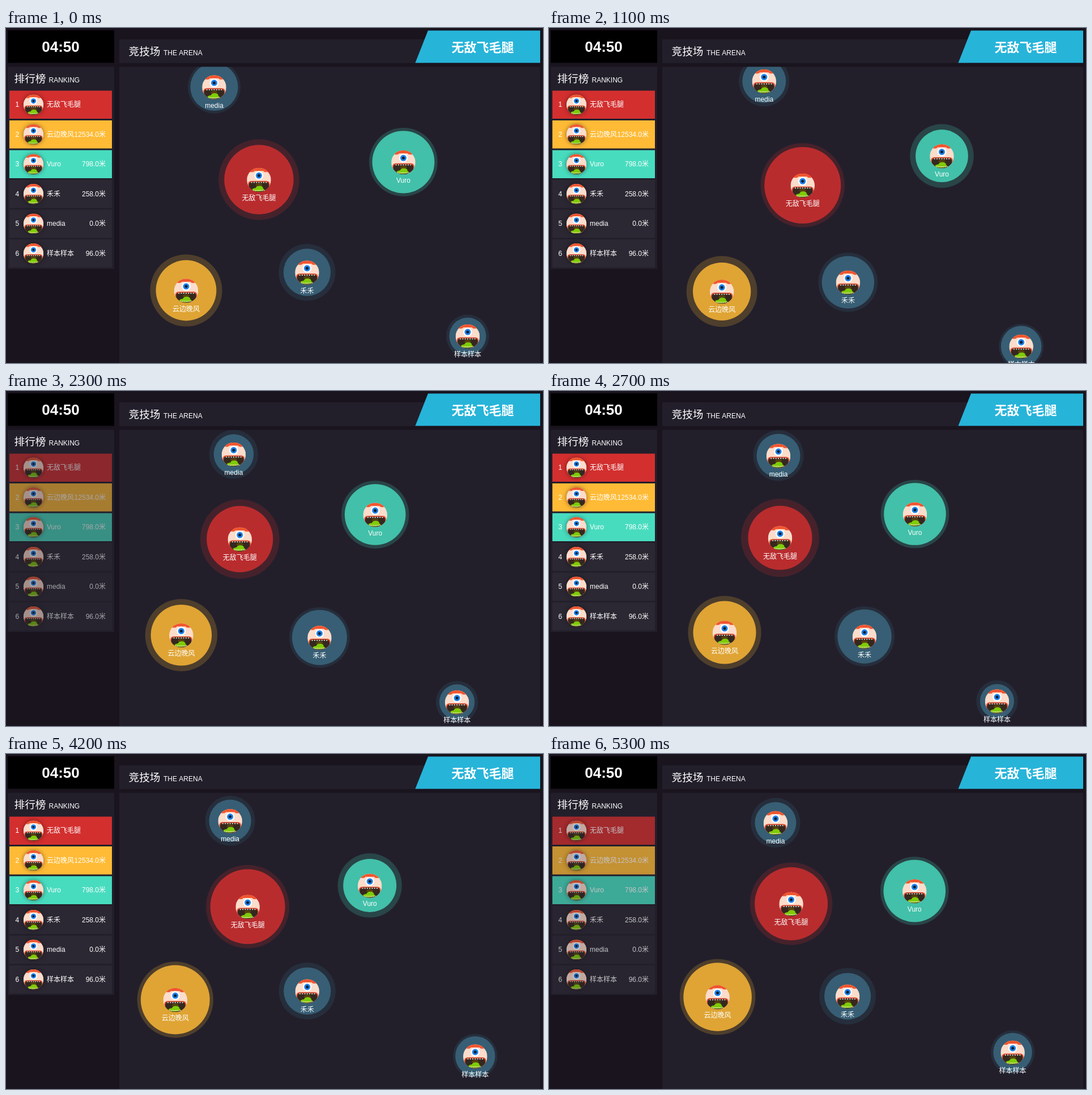
These frames come from a looping animation (948x591 px, 5.4 s). An HTML page with a canvas:

```html
<!DOCTYPE html>
<html lang="zh">
<head>
<meta charset="utf-8">
<title>竞技场</title>
<style>
html, body { margin: 0; width: 100%; height: 100%; overflow: hidden; background: #19141e; }
canvas { display: block; }
</style>
</head>
<body>
<canvas id="stage" width="948" height="591"></canvas>
<script>
const W = 948, H = 591, LOOP = 5400, TICK = 100;
const FONT = '"Liberation Sans", Arial, "Noto Sans CJK SC", "Noto Sans CJK", sans-serif';
const PAGE = '#19141e', PANEL = '#221f2b', GREY = '#2b2833';
const RED = '#d32f2f', GOLD = '#ffbb36', MINT = '#48dcbf', BLUE = '#3b6a81';

// All balls glide from waypoint to waypoint together; the loop opens mid-leg.
const LEG = 1800;

// In ranking order. pulse: period and moment of the largest size, in ms.
const players = [
  { name: '无敌飞毛腿', score: '', color: RED, pulse: [3650, 1000],
    path: [[444, 257], [449, 278], [408, 259], [428, 270], [427, 256]] },
  { name: '云边晚风', score: '12534.0米', color: GOLD, pulse: [7000, 4600],
    path: [[331, 460], [305, 466], [310, 426], [298, 434], [297, 421]] },
  { name: 'Vuro', score: '798.0米', color: MINT, pulse: [2600, 0],
    path: [[708, 247], [695, 226], [646, 217], [642, 233], [650, 254]] },
  { name: '禾禾', score: '258.0米', color: BLUE, pulse: [5500, 2100],
    path: [[536, 413], [527, 449], [557, 433], [530, 417], [523, 442]] },
  { name: 'media', score: '0.0米', color: BLUE, pulse: [1600, 1520],
    path: [[356, 115], [379, 93], [405, 114], [395, 118], [407, 126]] },
  { name: '样本样本', score: '96.0米', color: BLUE, pulse: [3650, 1000],
    path: [[795, 525], [835, 562], [791, 547], [831, 532], [801, 518]] }
];

const stage = document.getElementById('stage').getContext('2d');

const ease = u => (1 - Math.cos(Math.PI * u)) / 2;
const mix = (a, b, u) => a + (b - a) * u;

function text(c, str, x, y, size, align = 'left', weight = '') {
  c.font = `${weight} ${size}px ${FONT}`;
  c.textAlign = align;
  c.fillStyle = '#fff';
  c.fillText(str, x, y);
}

function rect(c, color, x, y, w, h) {
  c.fillStyle = color;
  c.fillRect(x, y, w, h);
}

function blob(c, color, x, y, rx, ry = rx) {
  c.fillStyle = color;
  c.beginPath();
  c.ellipse(x, y, rx, ry, 0, 0, Math.PI * 2);
  c.fill();
}

function mouth(c, color, inset) {
  c.fillStyle = color;
  c.beginPath();
  c.roundRect(-0.9 + inset, 0.08 + inset, 1.8 - 2 * inset, 0.92 - inset, [0.25, 0.25, 0.5, 0.5]);
  c.fill();
}

function monster(c, x, y, r) {
  c.save();
  c.translate(x, y);
  c.scale(r, r);
  c.beginPath();
  c.arc(0, 0, 1, 0, Math.PI * 2);
  c.clip();
  rect(c, '#fcdccb', -1, -1, 2, 2);
  rect(c, '#f1552f', -1, -1, 2, 0.26);
  for (const side of [-1, 1]) blob(c, '#f1552f', side * 0.6, -0.74, 0.22, 0.1);
  blob(c, '#ffffff', 0, -0.36, 0.37);
  blob(c, '#1f82ee', 0, -0.36, 0.26);
  blob(c, '#10202f', 0, -0.36, 0.12);
  mouth(c, '#e2492f', 0);
  mouth(c, '#35281f', 0.07);
  blob(c, '#55420f', 0, 0.42, 0.28, 0.14);
  blob(c, '#7fcb08', 0.04, 0.66, 0.3, 0.17);
  blob(c, '#7fcb08', -0.06, 0.8, 0.5, 0.15);
  for (let i = -3; i <= 3; i++) {
    rect(c, '#f7e3d2', i * 0.2 - 0.05, 0.17, 0.1, 0.08);
    rect(c, '#f7e3d2', i * 0.15 - 0.05, 0.84, 0.1, 0.06);
  }
  c.restore();
}

// The rows are painted once so that they can fade as a group.
function paintRows() {
  const layer = document.createElement('canvas');
  layer.width = 192;
  layer.height = H;
  const c = layer.getContext('2d');
  players.forEach(({ name, score, color }, i) => {
    const top = 110.5 + i * 52.5, mid = top + 24.75, base = Math.round(mid + 4);
    rect(c, color === BLUE ? GREY : color, 6, top, 181, 49.5);
    c.save();
    c.shadowColor = 'rgba(0,0,0,.55)';
    c.shadowBlur = 8;
    blob(c, '#6b4a40', 48.5, mid, 17);
    c.restore();
    monster(c, 48.5, mid, 17.8);
    text(c, String(i + 1), 16.5, base, 12);
    text(c, name, 72, base, 12);
    text(c, score, 176, base, 12, 'right');
  });
  return layer;
}
const rowLayer = paintRows();

// The list is cleared every 2900 ms, returns 300 ms later (null until then) and fades in.
function listOpacity(t) {
  if (t < 1600) return 1;
  const since = (t - 1600) % 2900 - 300;
  return since < 0 ? null : Math.min(1, (since + 50) / 750);
}

function drawBall(c, { name, color, pulse, path }, rank, t) {
  const leg = t / LEG + 0.5, i = Math.floor(leg), u = ease(leg - i);
  const [x, y] = path[i].map((from, axis) => mix(from, path[i + 1][axis], u));
  const size = 62 - 5.8 * rank;
  const swell = 0.09 * Math.cos(2 * Math.PI * (t - pulse[1]) / pulse[0]);
  c.globalAlpha = 0.2;
  blob(c, color, x, y, size * (1.155 + 0.48 * swell));
  c.globalAlpha = 0.82;
  blob(c, color, x, y, size * (1 + swell));
  c.globalAlpha = 1;
  monster(c, x, y + 0.5, 21.3);
  text(c, name, x, y + 36.5, 12, 'center');
}

function drawHeader(c) {
  rect(c, '#000', 3, 4, 188, 57.5);
  text(c, '04:50', 96.5, 41.5, 26, 'center', 'bold');
  rect(c, PANEL, 200, 20, 540, 42);
  text(c, '竞技场', 216.5, 48, 18.7);
  text(c, 'THE ARENA', 278, 47.5, 12);
  c.fillStyle = '#27b4d9';
  c.beginPath();
  c.moveTo(745, 4.4);
  c.lineTo(943, 4.4);
  c.lineTo(943, 61.6);
  c.lineTo(722.5, 61.6);
  c.fill();
  text(c, '无敌飞毛腿', 841.5, 41.5, 22, 'center', 'bold');
}

function drawRanking(c, t) {
  const opacity = listOpacity(t);
  rect(c, PANEL, 3, 68.5, 188, opacity === null ? 42 : 356.5);
  text(c, '排行榜', 14.5, 96, 18.7);
  text(c, 'RANKING', 75.5, 95.5, 12);
  if (opacity === null) return;
  c.globalAlpha = opacity;
  c.drawImage(rowLayer, 0, 0);
  c.globalAlpha = 1;
}

function drawArena(c, t) {
  c.save();
  c.beginPath();
  c.rect(200, 68.5, 743, H);
  c.clip();
  rect(c, PANEL, 200, 68, 743, H);
  players.forEach((player, rank) => drawBall(c, player, rank, t));
  c.restore();
}

function frame() {
  const t = Math.floor((performance.now() - start) % LOOP / TICK) * TICK;
  rect(stage, PAGE, 0, 0, W, H);
  drawHeader(stage);
  drawRanking(stage, t);
  drawArena(stage, t);
  requestAnimationFrame(frame);
}

const start = performance.now();
frame();
</script>
</body>
</html>
```
